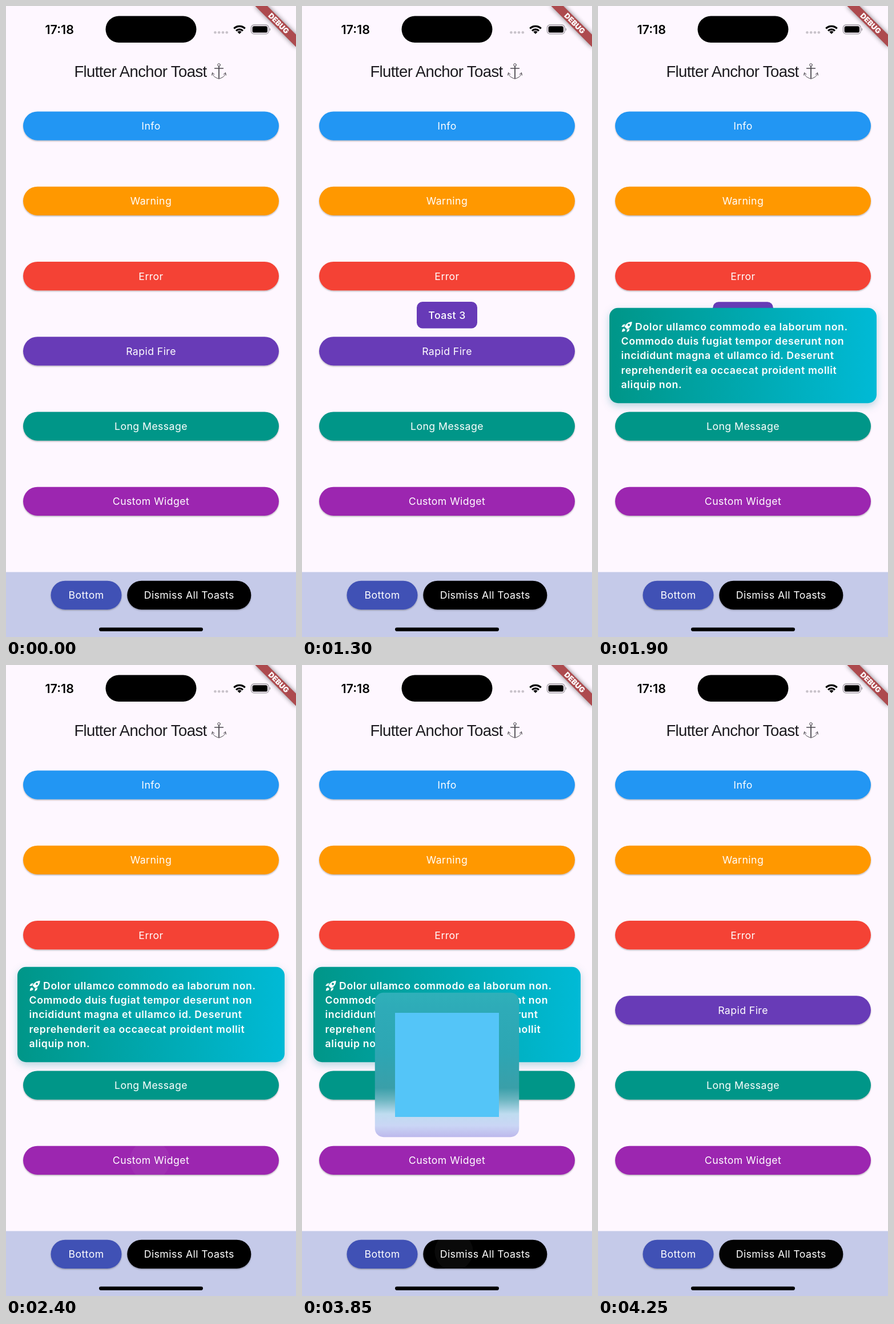
Recreate the animation shown at these times as an HTML page. Size 508x1103 px, loop 4.3 s.

```html
<!DOCTYPE html>
<html lang="en">
<head>
<meta charset="utf-8">
<title>Anchor toast demo</title>
<style>
  html, body { margin: 0; width: 100%; height: 100%; overflow: hidden; background: #fef7ff; }
  svg { display: block; width: 100%; height: 100%; }
  text { font-family: Inter, Roboto, sans-serif; }
  .label { font-size: 17.7px; font-weight: 420; letter-spacing: .42px; fill: #fff; text-anchor: middle; }
  .title { font: 27.5px "Liberation Sans", Arial, sans-serif; letter-spacing: -.59px; fill: #1d1b20; }
  .clock { font-size: 21.5px; font-weight: 600; text-anchor: middle; }
  .debug { font-size: 12.9px; font-weight: 900; fill: #fff; text-anchor: middle; }
  .toast { font-weight: 500; }
  .long { font-size: 17.7px; font-weight: 600; letter-spacing: .61px; fill: #fff; }
</style>
</head>
<body>
<svg viewBox="0 0 508 1103" xmlns="http://www.w3.org/2000/svg">
  <defs>
    <filter id="lift" x="-5%" y="-20%" width="110%" height="150%">
      <feDropShadow dx="0" dy="1.4" stdDeviation="1.3" flood-color="#000" flood-opacity=".3"/>
    </filter>
    <filter id="glow" x="-10%" y="-20%" width="120%" height="150%">
      <feDropShadow dx="0" dy="5" stdDeviation="7" flood-color="#00778a" flood-opacity=".28"/>
    </filter>
    <filter id="blur" x="-30%" y="-150%" width="160%" height="400%">
      <feGaussianBlur stdDeviation="4"/>
    </filter>
    <linearGradient id="teal">
      <stop stop-color="#009688"/><stop offset="1" stop-color="#06bad6"/>
    </linearGradient>
    <linearGradient id="frost" x2="0" y2="1">
      <stop stop-color="#2fb0b9"/>
      <stop offset=".11" stop-color="#2eabb8"/>
      <stop offset=".42" stop-color="#2da6b3"/>
      <stop offset=".66" stop-color="#3a9fa9"/>
      <stop offset=".74" stop-color="#6bb5c0"/>
      <stop offset=".84" stop-color="#bfdcf0"/>
      <stop offset=".92" stop-color="#cad6f5"/>
      <stop offset="1" stop-color="#bdb8ec"/>
    </linearGradient>
  </defs>

  <rect width="508" height="1103" fill="#fef7ff"/>
  <rect y="989.5" width="508" height="113.5" fill="#c5cae9"/>
  <text class="title" x="119.4" y="123.5">Flutter Anchor Toast</text>
  <g fill="none" stroke="#4a474d" stroke-width="1" stroke-linecap="round">
    <circle cx="373" cy="103" r="2.3"/>
    <path d="M365.5 109H380.5" stroke-width="1.3"/>
    <path d="M373 105.5V126" stroke-width="1.8"/>
    <path d="M361.5 117.5C363 124 368 125.5 373 127.3C378 125.5 383 124 384.5 117.5"/>
    <path d="M360.5 121L361.5 116.5L365 119.5M385.5 121L384.5 116.5L381 119.5"/>
  </g>

  <g id="buttons"></g>
  <g id="toasts"></g>

  <g id="system">
    <text class="clock" x="93.7" y="48.7">17:18</text>
    <rect x="174.5" y="17.5" width="159" height="46.5" rx="23.2"/>
    <g fill="#c9c3cb">
      <circle cx="366.4" cy="46.3" r="2.3"/><circle cx="373.2" cy="46.3" r="2.3"/>
      <circle cx="380" cy="46.3" r="2.3"/><circle cx="386.8" cy="46.3" r="2.3"/>
    </g>
    <g fill="none" stroke="#000" stroke-width="3.2">
      <path d="M399.3 39.4A13.8 13.8 0 0 1 418.7 39.4"/>
      <path d="M403 43.4A8.6 8.6 0 0 1 415 43.4"/>
    </g>
    <path d="M409 49L405.4 45.3A5.2 5.2 0 0 1 412.6 45.3Z"/>
    <rect x="429.4" y="33" width="30.8" height="15.8" rx="5" fill="none" stroke="#9d98a0" stroke-width="1.3"/>
    <rect x="431.6" y="35.2" width="26.4" height="11.4" rx="3.2"/>
    <path d="M461.6 38.3A3 3 0 0 1 461.6 43.7Z" fill="#9d98a0"/>
    <rect x="163" y="1086.6" width="182" height="6.3" rx="3.1"/>
    <g transform="translate(508 0) rotate(45)">
      <rect x="-50.5" y="35.4" width="101" height="15.2" opacity=".5" filter="url(#blur)"/>
      <rect x="-50.5" y="35.4" width="101" height="15.2" fill="#ad4a4e"/>
      <text class="debug" y="47.5">DEBUG</text>
    </g>
  </g>
</svg>
<script>
const LOOP = 4300, STEP = 50, RISE = 250;
const $ = id => document.getElementById(id);
const clamp = v => Math.min(1, Math.max(0, v));
const easeOut = v => 1 - (1 - v) ** 3;

// Buttons: label, colour, x, y, width and, where tapped, time and point of the tap
const row = i => 184.4 + 131.25 * i;
const buttons = [
  ['Info', '#2196f3', 30, row(0), 448],
  ['Warning', '#ff9800', 30, row(1), 448],
  ['Error', '#f44336', 30, row(2), 448],
  ['Rapid Fire', '#673ab7', 30, row(3), 448, 290, 254, 603],
  ['Long Message', '#009688', 30, row(4), 448, 1300, 254, 735],
  ['Custom Widget', '#9c27b0', 30, row(5), 448, 2372, 252, 866],
  ['Bottom', '#3f51b5', 78.5, 1004.7, 124],
  ['Dismiss All Toasts', '#000', 212.3, 1004.7, 217, 3825, 266, 1025]
];
$('buttons').innerHTML = buttons.map(([label, color, x, y, w, tap, px, py], i) => {
  const pill = `x="${x}" y="${y}" width="${w}" height="50.3" rx="25.1"`;
  const splash = tap === undefined ? '' :
    `<clipPath id="clip${i}"><rect ${pill}/></clipPath>
     <g clip-path="url(#clip${i})"><circle id="splash${i}" cx="${px}" cy="${py}" fill="#fff"/></g>`;
  return `<rect ${pill} fill="${color}" filter="url(#lift)"/>${splash}
    <text class="label" x="${x + w / 2}" y="${y + 31.6}">${label}</text>`;
}).join('');

// Toasts are drawn around their own centre
const box = (w, h, r, fill, extra = '') =>
  `<rect x="${-w / 2}" y="${-h / 2}" width="${w}" height="${h}" rx="${r}" fill="${fill}" ${extra}/>`;
const small = n => box(106, 46.5, 10, '#673ab7') +
  `<text class="label toast" y="6.4">Toast ${n}</text>`;
const lines = [
  'Dolor ullamco commodo ea laborum non.',
  'Commodo duis fugiat tempor deserunt non',
  'incididunt magna et ullamco id. Deserunt',
  'reprehenderit ea occaecat proident mollit',
  'aliquip non.'
];
const rocket = `<g transform="translate(-213 -59.5)" fill="#fff">
  <path fill-rule="evenodd" d="M18.6 0.4C12 .6 8 4 5.6 9L10 13.4C15 11 18.4 7 18.6 .4ZM13 4A2 2 0 1 1 13 8A2 2 0 1 1 13 4Z"/>
  <path d="M7 4.8L2.8 5.6L0 9.6L4.6 9.2ZM14.2 12L13.4 16.2L9.4 19L9.8 14.4Z"/>
  <path d="M4.4 12.2C1.6 12.6 1.2 15.4 .8 18.2C3.6 17.8 6.4 17.4 6.8 14.6Z"/>
</g>`;
const long = box(468, 166.4, 15, 'url(#teal)', 'filter="url(#glow)"') + rocket +
  lines.map((s, i) =>
    `<text class="long" x="${i ? -213.5 : -189}" y="${-44 + 25.2 * i}">${s}</text>`).join('');
const card = box(252.5, 252.5, 15, 'url(#frost)') + box(182, 182, 0, '#54c5f8');

const toasts = [
  { body: small(1), y: 540.2, h: 46.5, from: 370, cut: 688 },
  { body: small(2), y: 540.2, h: 46.5, from: 688, cut: 992 },
  { body: small(3), y: 540.2, h: 46.5, from: 992, until: 1850 },
  { body: long, y: 611, h: 166.4, from: 1381, until: 3960 },
  { body: card, y: 699, h: 252.5, from: 2455, until: 3960 }
];
$('toasts').innerHTML = toasts.map((o, i) => `<g id="toast${i}">${o.body}</g>`).join('');

function drawToast(o, i, t) {
  const enter = clamp((t - o.from) / RISE);
  const leave = o.until ? clamp((t - o.until) / RISE) : +(t >= o.cut);
  const p = easeOut(Math.min(enter, 1 - leave));
  const g = $('toast' + i);
  g.setAttribute('opacity', p);
  g.setAttribute('visibility', p > 0 ? 'visible' : 'hidden');
  g.setAttribute('transform',
    `translate(254 ${o.y + .45 * o.h * (1 - p)}) scale(${.5 + .5 * p})`);
}

function drawSplash(tap, i, t) {
  const age = t - tap;
  const spread = clamp(age / 250) ** 1.4;
  const alpha = .12 * clamp(age / 75) * (1 - clamp((age - 200) / 250));
  const c = $('splash' + i);
  c.setAttribute('r', 25 + 215 * spread);
  c.setAttribute('opacity', alpha);
}

const start = performance.now();
function draw() {
  const t = Math.floor((performance.now() - start) % LOOP / STEP) * STEP;
  toasts.forEach((o, i) => drawToast(o, i, t));
  buttons.forEach((b, i) => { if (b[5] !== undefined) drawSplash(b[5], i, t); });
  requestAnimationFrame(draw);
}
draw();
</script>
</body>
</html>
```
